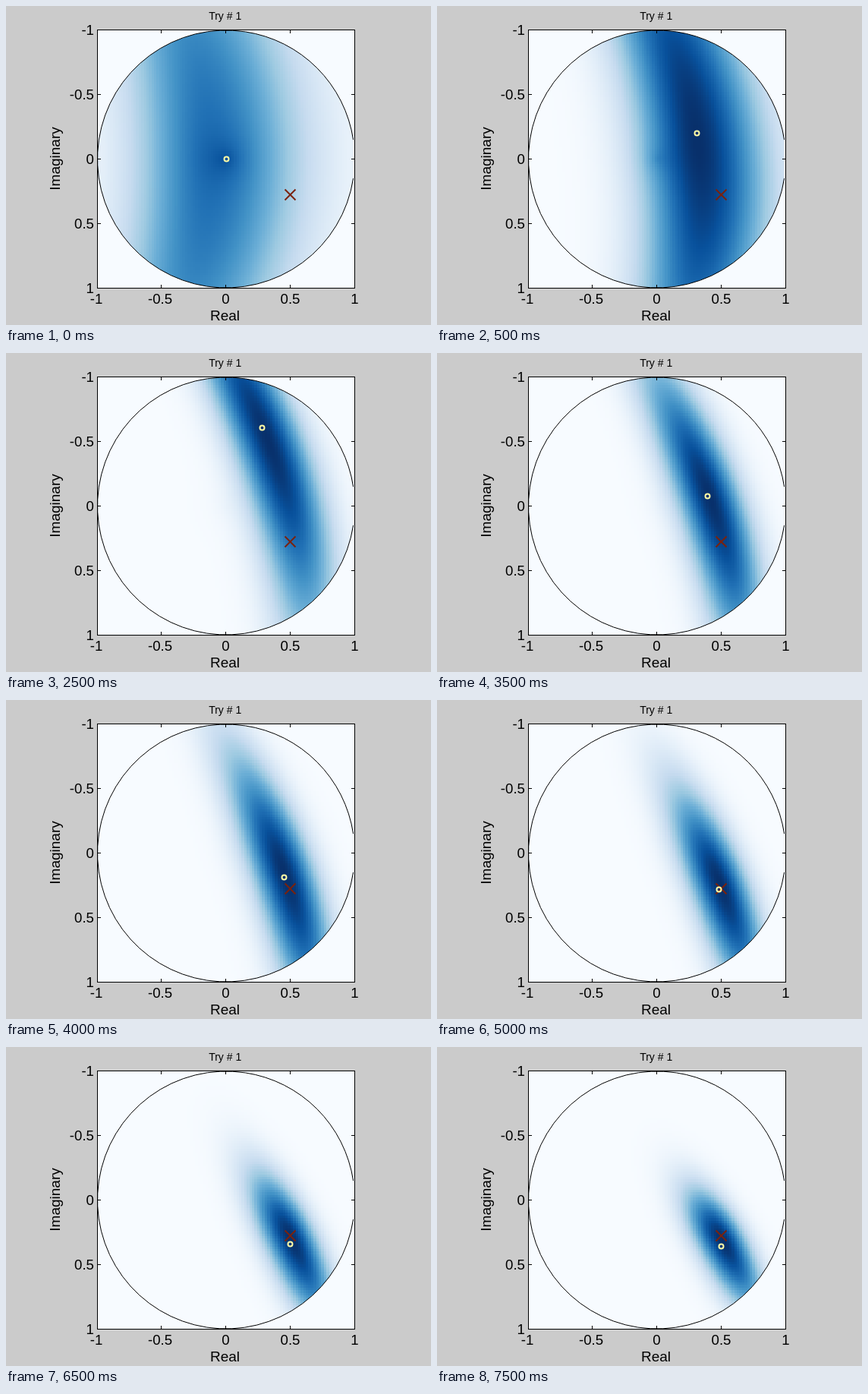
Animation, 560 px wide and 420 px high, one loop 8000 ms. Source, as an HTML page with a canvas:

```html
<!DOCTYPE html>
<html lang="en">
<head>
<meta charset="utf-8">
<title>Estimate in the unit disc</title>
<style>
  html, body { margin: 0; width: 100%; height: 100%; overflow: hidden; background: #cbcbcb; }
  canvas { display: block; }
</style>
</head>
<body>
<canvas id="stage" width="560" height="420"></canvas>
<script>
const ctx = document.getElementById('stage').getContext('2d');
const CELLS = 100, STEP = 500, COUNT = 16;
const CX = 290, CY = 201.5, R = 169.5;
const FONT = '"Liberation Sans", Arial, sans-serif';

const heat = document.createElement('canvas');
heat.width = heat.height = CELLS;
const heatCtx = heat.getContext('2d');
const pixels = heatCtx.createImageData(CELLS, CELLS);

// Light to dark blue ramp
const RAMP = ['f7fbff', 'deebf7', 'c6dbef', '9ecae1', '6baed6', '4292c6', '2171b5', '08519c', '08306b']
  .map(h => [0, 2, 4].map(i => parseInt(h.slice(i, i + 2), 16)));

// Where the guess wanders: step, x, y
const PATH = [
  [0, 0, 0], [1, .31, -.2], [3, .345, -.09], [5, .28, -.605],
  [8, .45, .19], [11, .5, .33], [15, .5, .36]
];

function guessAt(step) {
  let i = 0;
  while (i < PATH.length - 2 && PATH[i + 1][0] <= step) i++;
  const a = PATH[i], b = PATH[i + 1];
  const k = (step - a[0]) / (b[0] - a[0]);
  return { x: a[1] + (b[1] - a[1]) * k, y: a[2] + (b[2] - a[2]) * k };
}

// A curved ridge through the guess that narrows, shortens and tilts with each step
function likelihood(step, guess) {
  const n = Math.max(step, .4), fresh = Math.exp(-4 * step);
  const slope = .5 * (step / 15) ** .6, bend = -.14 + .006 * step;
  const left = .32 * n ** -.28, right = .36 * n ** -.37;
  const up = 1.8 * Math.exp(-step / 8), down = 1.9 * Math.exp(-step / 9.5);
  const height = 1 - .24 * fresh, bump = .15 * Math.exp(-step / 2.5);
  const shift = .002 * step - .12 * fresh, peak = .85 * guess.y;
  return (x, y) => {
    const mid = guess.x + shift + slope * (y - guess.y) + bend * (y * y - guess.y ** 2);
    const dx = (x - mid) / (x < mid ? left : right);
    const dy = (y - peak) / (y < peak ? up : down);
    return height * Math.exp(-(dx * dx + dy * dy) / 2) + bump * Math.exp(-Math.hypot(x, y) / .13);
  };
}

function drawField(field) {
  const coord = i => (i + .5) / CELLS * 2 - 1;
  for (let j = 0, p = 0; j < CELLS; j++) {
    for (let i = 0; i < CELLS; i++, p += 4) {
      const s = Math.min(field(coord(i), coord(j)), 1) * 8;
      const n = Math.min(7, Math.floor(s));
      for (let c = 0; c < 3; c++) {
        pixels.data[p + c] = RAMP[n][c] + (RAMP[n + 1][c] - RAMP[n][c]) * (s - n);
      }
      pixels.data[p + 3] = 255;
    }
  }
  heatCtx.putImageData(pixels, 0, 0);
  ctx.save();
  ctx.beginPath();
  ctx.rect(121, 31, 336.5, 341);
  ctx.clip();
  ctx.beginPath();
  ctx.arc(CX, CY, R, 0, 7);
  ctx.clip();
  ctx.imageSmoothingEnabled = false;
  ctx.drawImage(heat, CX - R, CY - R, 2 * R, 2 * R);
  ctx.restore();
}

function line(x1, y1, x2, y2) {
  ctx.beginPath();
  ctx.moveTo(x1, y1);
  ctx.lineTo(x2, y2);
  ctx.stroke();
}

function text(str, x, y, size, align = 'center') {
  ctx.font = `${size}px ${FONT}`;
  ctx.textAlign = align;
  ctx.fillText(str, x, y);
}

function drawAxes() {
  ctx.strokeStyle = ctx.fillStyle = '#000';
  ctx.lineWidth = 1;
  ctx.beginPath();
  ctx.arc(CX, CY, R, .15, 2 * Math.PI - .15);
  ctx.stroke();
  ctx.strokeRect(120.5, 31.5, 339, 340);
  for (let i = 0; i < 5; i++) {
    const label = String(i / 2 - 1);
    const x = Math.floor(120 + i * 84.9) + .5, y = 31.5 + i * 85;
    line(x, 32, x, 36);
    line(x, 371, x, 367);
    line(121, y, 125, y);
    line(459, y, 455, y);
    text(label, x - (label[0] === '-' ? 1.5 : 0), 391.5, 18.67);
    text(label, 116, Math.round(y + 6.4), 18.67, 'right');
  }
  text('Try # 1', 288.7, 18, 14);
  text('Real', 288.5, 413.5, 19);
  ctx.save();
  ctx.translate(71, 201);
  ctx.rotate(-Math.PI / 2);
  text('Imaginary', 0, 0, 19);
  ctx.restore();
}

function drawMarks(guess) {
  ctx.lineWidth = 2;
  ctx.strokeStyle = '#7a220d';
  line(367.5, 241.5, 381.5, 255.5);
  line(381.5, 241.5, 367.5, 255.5);
  ctx.strokeStyle = '#fffba6';
  ctx.beginPath();
  ctx.arc(Math.floor(CX + guess.x * R) + .5, Math.floor(CY + guess.y * R) + .5, 3, 0, 7);
  ctx.stroke();
}

let shown = -1;
function frame() {
  const step = Math.floor(performance.now() / STEP) % COUNT;
  if (step !== shown) {
    shown = step;
    const guess = guessAt(step);
    ctx.fillStyle = '#cbcbcb';
    ctx.fillRect(0, 0, 560, 420);
    ctx.fillStyle = '#f7fbff';
    ctx.fillRect(120, 31, 340, 341);
    drawField(likelihood(step, guess));
    drawAxes();
    drawMarks(guess);
  }
  requestAnimationFrame(frame);
}
frame();
</script>
</body>
</html>
```
